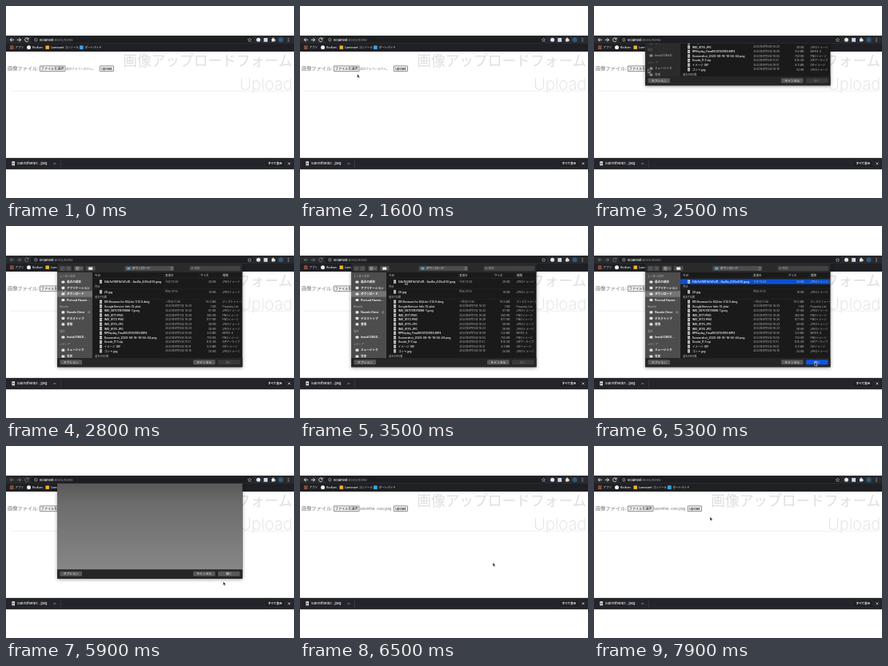
Write an HTML page that moves like this. It is 360 by 240 pixels and loops after 8000 ms.

```html
<!DOCTYPE html>
<html lang="ja">
<head>
<meta charset="utf-8">
<title>画像アップロードフォーム</title>
<style>
  html, body { margin: 0; width: 100%; height: 100%; overflow: hidden; background: #fff; }
  svg { display: block; width: 360px; height: 240px; }
  text { font-family: Inter, "Noto Sans CJK JP", "Noto Sans CJK", sans-serif; font-weight: 500; white-space: pre; }
  .thin { font-weight: 200; }
  .plain { font-weight: 400; }
  .bold { font-weight: 600; }
  .shadow { filter: drop-shadow(0 1px 2px rgba(0, 0, 0, .4)); }
</style>
</head>
<body>
<svg id="stage" viewBox="0 0 360 240" xmlns="http://www.w3.org/2000/svg">
  <defs>
    <clipPath id="below"><rect x="56" y="47" width="250" height="143"/></clipPath>
    <clipPath id="side"><rect x="64" y="58" width="44" height="107"/></clipPath>
    <clipPath id="list"><rect x="108" y="58" width="187" height="107"/></clipPath>
    <linearGradient id="blank" x2="0" y2="1">
      <stop offset="0" stop-color="#505050"/>
      <stop offset=".3" stop-color="#6c6c6c"/>
      <stop offset="1" stop-color="#868686"/>
    </linearGradient>
  </defs>
</svg>
<script>
const NS = 'http://www.w3.org/2000/svg';
const stage = document.getElementById('stage');
const LOOP = 8000, STEP = 100;

function add(parent, tag, attrs) {
  const el = document.createElementNS(NS, tag);
  for (const k in attrs) el.setAttribute(k, attrs[k]);
  return parent.appendChild(el);
}
const group = (parent, attrs = {}) => add(parent, 'g', attrs);
const box = (p, x, y, width, height, fill, more = {}) => add(p, 'rect', { x, y, width, height, fill, ...more });
const dot = (p, cx, cy, r, fill, more = {}) => add(p, 'circle', { cx, cy, r, fill, ...more });
const line = (p, d, stroke, w = 0.7, more = {}) => add(p, 'path', { d, stroke, 'stroke-width': w, fill: 'none', ...more });
// y is the vertical middle of the text
function label(p, x, y, str, size, fill, more = {}) {
  const el = add(p, 'text', { x, y: y + size * 0.36, 'font-size': size, fill, ...more });
  el.textContent = str;
  return el;
}
const MID = { 'text-anchor': 'middle' }, END = { 'text-anchor': 'end' };
const PLAIN = { class: 'plain' }, BOLD = { class: 'bold' };

// Browser window
function drawBrowser() {
  box(stage, 0, 37, 360, 20.3, '#1f2024');
  box(stage, 0, 37, 360, 10, '#292a2e');
  box(stage, 31, 38.3, 278, 7.6, '#1d1e21', { rx: 3.8 });
  const nav = group(stage);
  line(nav, 'M10 42.3H5.2M7.4 40.1L5.2 42.3L7.4 44.5M13.8 42.3H18.6M16.4 40.1L18.6 42.3L16.4 44.5', '#f1f1f1', 0.85);
  line(nav, 'M27.8 41A2.3 2.3 0 1 0 28 43.2M28.1 39.7V41.5H26.3', '#f1f1f1', 0.8);
  dot(stage, 37.3, 42.3, 1.8, 'none', { stroke: '#b9bbbf', 'stroke-width': 0.6 });
  line(stage, 'M37.3 42V43.4M37.3 40.9V41.4', '#b9bbbf', 0.5);
  const url = label(stage, 42, 42.3, '', 4.05, '#85888d');
  add(url, 'tspan', { fill: '#fff' }).textContent = 'localhost';
  add(url, 'tspan', {}).textContent = ':8000/home';
  line(stage, 'M304.5 40L305.2 41.6L306.9 41.7L305.6 42.8L306 44.5L304.5 43.6L303 44.5L303.4 42.8L302.1 41.7L303.8 41.6Z', '#c8c9cc', 0.5);
  dot(stage, 315.5, 42.3, 2.5, '#e8e8e8');
  box(stage, 322.2, 40, 4.8, 4.8, '#c9d9f2');
  box(stage, 332, 40.8, 3.8, 3.8, '#e2e2e2', { rx: 0.5 });
  dot(stage, 334, 40.4, 0.9, '#e2e2e2');
  dot(stage, 336, 42.7, 0.9, '#e2e2e2');
  dot(stage, 343.5, 42.3, 3, '#2d5c80');
  for (let i = 0; i < 3; i++) dot(stage, 353, 40.5 + i * 1.8, 0.55, '#e0e0e0');

  for (let i = 0; i < 9; i++)
    box(stage, 5 + (i % 3) * 1.7, 49.4 + Math.floor(i / 3) * 1.7, 1.2, 1.2, ['#d3644d', '#cf9b43', '#d3644d'][i % 3]);
  dot(stage, 28.5, 51.7, 2.5, '#f2f2f2');
  box(stage, 49.5, 49.5, 4.4, 4.4, '#f2b529');
  box(stage, 92, 49.4, 4.6, 4.6, '#3aa5dd');
  [[11.4, 'アプリ'], [33, 'Kodlum'], [56, 'Lumovant コンソール'], [98.6, 'ダートパッド']]
    .forEach(([x, s]) => label(stage, x, 51.7, s, 3.5, '#f0f0f0'));

  box(stage, 0, 57, 360, 133, '#fff');
  const pale = { ...END, class: 'thin' };
  label(stage, 358, 68.2, '画像アップロードフォーム', 17.7, '#dfdfdf', pale);
  label(stage, 358.3, 97.2, 'Upload', 20.3, '#dfdfdf', pale);
  line(stage, 'M5.5 106.3H357', '#dadada', 0.6, { 'stroke-dasharray': '2 1' });
  label(stage, 2, 77.3, '画像ファイル:', 6.2, '#777');
  const button = (x, w, s, size) => {
    box(stage, x, 74.9, w, 6.8, '#efefef', { stroke: '#666', 'stroke-width': 0.7, rx: 0.4 });
    label(stage, x + w / 2, 78.3, s, size, '#111', MID);
  };
  button(42.3, 31.7, 'ファイルを選択', 4.1);
  button(117.2, 17.3, 'Upload', 3.9);
  const status = label(stage, 75, 78.4, '', 3.7, '#888', PLAIN);

  box(stage, 0, 190, 360, 14.2, '#24252a');
  line(stage, 'M0 190.2H360', '#3c3e42', 0.4);
  box(stage, 7.4, 194.3, 3.6, 5, '#e9e9e9');
  box(stage, 8, 196, 2.4, 1.8, '#777');
  label(stage, 14.3, 197, '54b7e1f981b7....jpeg', 3.8, '#fff');
  line(stage, 'M59.3 197.8L60.8 196.3L62.3 197.8', '#c8c8c8', 0.7);
  line(stage, 'M68.3 191.5V202.5', '#4a4c50', 0.5);
  box(stage, 323.3, 192.6, 25.3, 8.8, '#1f2024', { stroke: '#34363a', 'stroke-width': 0.5, rx: 1 });
  label(stage, 336.3, 197, 'すべて表示', 3.6, '#fff', { ...MID, ...BOLD });
  line(stage, 'M352.5 195.5L355.3 198.3M355.3 195.5L352.5 198.3', '#e5e5e5', 0.7);
  return { nav, status };
}

// File chooser; y is given for the fully opened sheet
const SIDEBAR = [
  [62.5, 'よく使う項目'], [70, '最近の項目', 1], [77.3, 'アプリケーション', 1], [85, 'ダウンロード', 1],
  [92.5, 'Pictoral Haven…', 1], [100.7, 'Nuvelo'], [107.8, 'Nuvelo Drive', 1], [115.3, 'デスクトップ', 1],
  [122.8, '書類', 1], [131.7, '場所'], [139, 'Install DB4S…', 1], [148, 'メディア'],
  [155.2, 'ミュージック', 1], [163, '写真', 1]
];
const JPEG = 'JPEGイメージ', PNG = 'PNGイメージ';
const FILES = [
  ['DB.Browser.for.SQLite-3.12.0.dmg', '一昨日 11:45', '19.2 MB', 'ディスクイメージ'],
  ['GoogleService-Info (1).plist', '2020年9月17日 16:33', '1 KB', 'Property List'],
  ['IMG_587011878896-1.jpeg', '2020年9月17日 16:32', '97 KB', JPEG],
  ['IMG_9171.PNG', '2020年9月17日 16:28', '360 KB', PNG],
  ['IMG_9173.PNG', '2020年9月17日 16:28', '877 KB', PNG],
  ['IMG_9175.JPG', '2020年9月16日 16:23', '58 KB', JPEG],
  ['IMG_9176.JPG', '2020年9月16日 16:23', '38 KB', JPEG],
  ['RPReplay_Final1600150185.MP4', '2020年9月15日 16:09', '3.6 MB', 'MPEG-4'],
  ['Screenshot_2020-09-16-16-54-44.png', '2020年9月16日 16:55', '753 KB', PNG],
  ['Xcode_11.7.xip', '2020年9月15日 11:01', '8.15 GB', 'XIPアーカイブ'],
  ['イメージ.GIF', '2020年9月15日 18:01', '9.3 MB', 'GIFイメージ'],
  ['ゴシャ.jpg', '2020年9月14日 16:18', '34 KB', JPEG]
];

function drawSheet() {
  const sheet = group(group(stage, { 'clip-path': 'url(#below)' }));
  box(sheet, 64, 47, 231.5, 129.3, '#242424', { class: 'shadow' });

  const full = group(sheet);
  box(full, 64, 47, 231.5, 11.5, '#2a2a2a');
  const pill = (x, w) => box(full, x, 50, w, 6, '#4c4c4c', { rx: 1.2 });
  pill(67, 7);
  pill(74.7, 7);
  line(full, 'M71.2 51.5L69.7 53L71.2 54.5M77.5 51.5L79 53L77.5 54.5', '#777', 0.6);
  pill(85, 12);
  for (let i = 0; i < 4; i++) line(full, `M87 ${51.3 + i * 1.15}H91.5`, '#ccc', 0.5);
  line(full, 'M93 52.5L94.1 53.6L95.2 52.5', '#ccc', 0.6);
  pill(100, 11.5);
  box(full, 103.2, 51.5, 5, 3.2, '#eee', { rx: 0.5 });
  pill(148.5, 61.5);
  box(full, 151.3, 51.4, 4, 3.2, '#4ba8e4', { rx: 0.4 });
  label(full, 157.5, 53, 'ダウンロード', 3.8, '#f4f4f4');
  line(full, 'M206 52.4L207.2 51.2L208.4 52.4M206 53.7L207.2 54.9L208.4 53.7', '#ddd', 0.6);
  box(full, 229.5, 50, 63.5, 6, '#424242', { rx: 1.2 });
  dot(full, 232.7, 52.7, 1.1, 'none', { stroke: '#aaa', 'stroke-width': 0.5 });
  label(full, 235.5, 53, '検索', 3.6, '#999');

  const side = group(full, { 'clip-path': 'url(#side)' });
  const sideBack = box(side, 64, 58, 44, 107, '#4d4d4d');
  box(side, 64, 81.3, 44, 7.4, '#747474');
  const places = group(side);
  for (const [y, s, item] of SIDEBAR) {
    if (item) box(places, 69.5, y - 1.6, 3.8, 3.2, '#e6e6e6', { rx: 0.9 });
    label(places, item ? 76 : 67, y, s, item ? 3.6 : 3.3, item ? '#fff' : '#aaa', item ? BOLD : {});
  }
  dot(side, 103.7, 107.8, 1.2, 'none', { stroke: '#bbb', 'stroke-width': 0.5 });

  const list = group(full, { 'clip-path': 'url(#list)' });
  box(list, 108, 58, 188, 107, '#1a1a1a');
  [[111, '今日'], [199.3, '変更日'], [243, 'サイズ'], [271, '種類']].forEach(([x, s]) => label(list, x, 62, s, 3.4, '#ddd'));
  line(list, 'M108 65.2H296M198 59.5V64.5M242 59.5V64.5M269 59.5V64.5', '#363636', 0.4);
  const pick = box(list, 108, 66.5, 188, 6.2, '#0a50d2');
  const row = (y, [name, date, size, kind]) => {
    box(list, 117, y - 2.1, 3, 4.2, '#dcdcdc');
    box(list, 117.5, y - 0.8, 2, 1.8, '#7c8996');
    label(list, 122.7, y, name, 3.5, '#fff');
    label(list, 199.3, y, date, 3.3, '#b4b4b4', PLAIN);
    label(list, 262.5, y, size, 3.4, '#b4b4b4', { ...END, ...PLAIN });
    label(list, 270.5, y, kind, 3.35, '#b4b4b4', PLAIN);
  };
  const heading = (y, s) => {
    label(list, 111, y, s, 3.3, '#bbb');
    line(list, `M108 ${y + 2.9}H296`, '#303030', 0.35);
  };
  row(69.6, ['54b7e1f981b7d7c81…6ad5e_400x400.jpeg', '今日 13:43', '29 KB', JPEG]);
  heading(75.8, '昨日');
  row(82.3, ['20.jpg', '昨日 21:14', '16 KB', JPEG]);
  heading(88.5, '過去7日間');
  FILES.forEach((f, i) => row(94.7 + i * 5.6, f));
  heading(163, '過去30日間');

  const blank = box(sheet, 64, 47, 231.5, 118, 'url(#blank)');
  box(sheet, 64, 165, 231.5, 11.3, '#262626');
  const button = (x, s) => [
    box(sheet, x, 167.3, 27.5, 6, '#585858', { rx: 1.2 }),
    label(sheet, x + 13.8, 170.3, s, 3.8, '#fff', MID)
  ];
  button(67.5, 'オプション');
  button(234, 'キャンセル');
  const [openBox, openText] = button(265, '開く');
  return { sheet, full, sideBack, places, pick, blank, openBox, openText };
}

// Rows of [time, ...values], joined with straight or eased moves
function at(keys, t, ease = u => u) {
  const i = keys.findIndex(k => k[0] > t);
  if (i < 0) return keys[keys.length - 1].slice(1);
  if (i === 0) return keys[0].slice(1);
  const a = keys[i - 1], b = keys[i], u = ease((t - a[0]) / (b[0] - a[0]));
  return a.slice(1).map((v, n) => v + (b[n + 1] - v) * u);
}
const smooth = u => u * u * (3 - 2 * u);
const SLIDE = [[2300, -134], [2400, -114], [2500, -77], [2600, -25], [2700, 0],
  [5800, 0], [5900, -10.5], [6000, -50], [6100, -105], [6200, -134]];
const POINTER = [[900, 150, 160], [1500, 71.5, 85], [1700, 71.5, 85], [2100, 67.5, 79], [2700, 67.5, 79],
  [3400, 131.5, 68.5], [3800, 131.5, 68.5], [4500, 217, 128], [5300, 276, 170], [5700, 276, 170],
  [5900, 271.5, 169.5], [6300, 255, 154], [7200, 145, 88.5]];

const { nav, status } = drawBrowser();
const ui = drawSheet();
const pointer = add(stage, 'path', {
  d: 'M0 0V4.7L1.1 3.7L1.9 5.4L2.7 5L1.9 3.4H3.4Z', fill: '#111', stroke: '#fff', 'stroke-width': 0.45
});
const show = (el, on) => el.setAttribute('visibility', on ? 'visible' : 'hidden');

function render(time) {
  const t = Math.floor((time % LOOP) / STEP) * STEP;
  const closing = t >= 5800, picked = t >= 3700;
  const open = t > 2300 && t < 6200, settled = t >= 2700;
  ui.sheet.setAttribute('transform', `translate(0 ${at(SLIDE, t)[0]})`);
  ui.sheet.setAttribute('display', open ? 'inline' : 'none');
  ui.full.setAttribute('display', closing ? 'none' : 'inline');
  ui.sideBack.setAttribute('fill', settled ? '#4d4d4d' : '#2b2b2b');
  ui.places.setAttribute('opacity', settled ? 1 : 0.5);
  show(ui.blank, closing);
  show(ui.pick, picked);
  ui.openBox.setAttribute('fill', closing ? '#585858' : picked ? '#0f55e0' : '#3a3a3a');
  ui.openText.setAttribute('fill', picked ? '#fff' : '#707070');
  nav.setAttribute('opacity', settled && t < 6200 ? 0.4 : 1);
  const done = t >= 6100;
  status.textContent = done ? '54b7e1f98…o400.jpeg' : '選択されていません。';
  status.setAttribute('fill', done ? '#666' : '#888');
  const [x, y] = at(POINTER, t, smooth);
  pointer.setAttribute('transform', `translate(${x} ${y})`);
  show(pointer, t >= 900);
}

const start = performance.now();
function tick() {
  render(performance.now() - start);
  requestAnimationFrame(tick);
}
tick();
</script>
</body>
</html>
```
